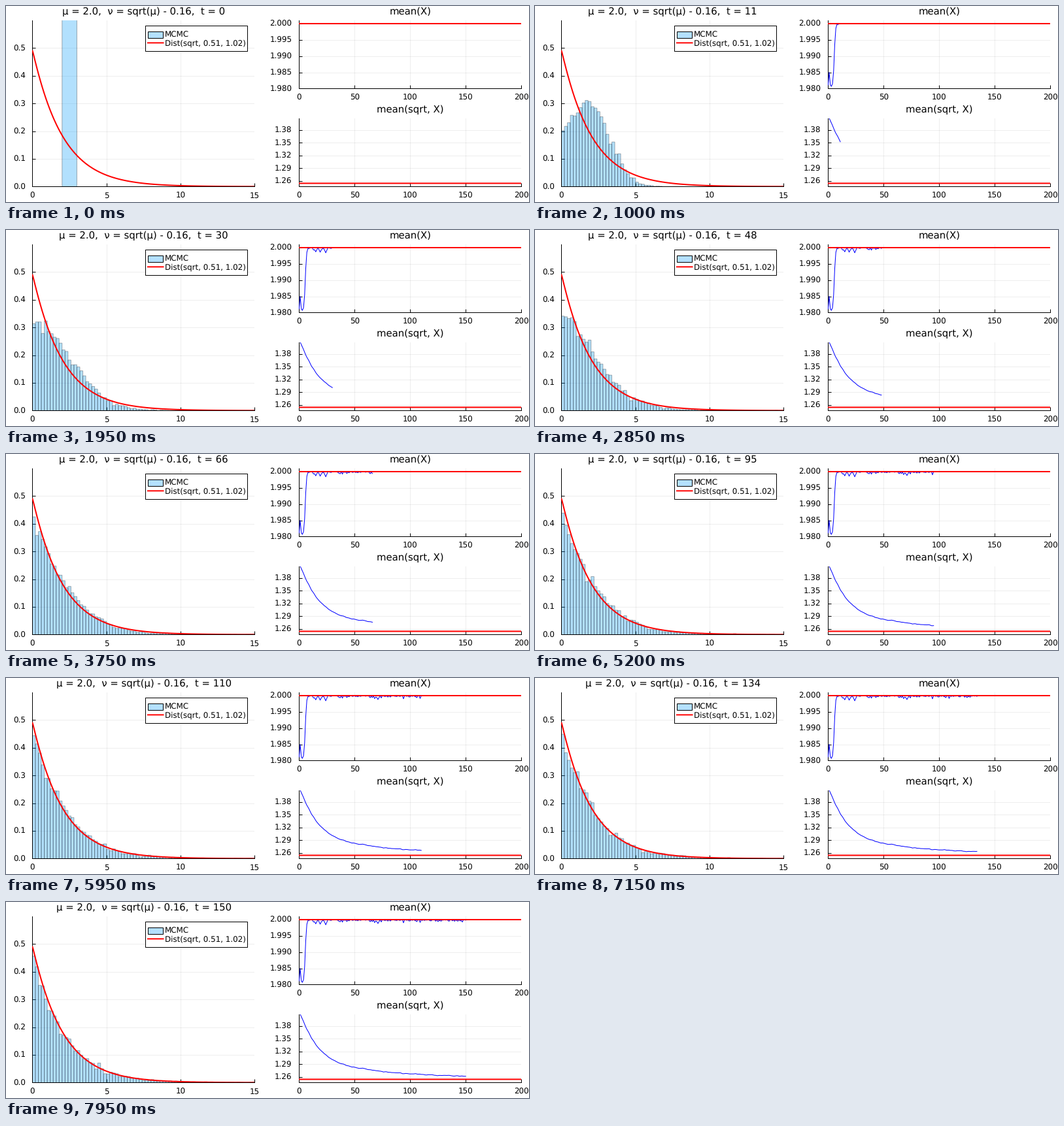
These frames come from a looping animation (800 by 300 pixels, 8 s). A matplotlib script:

```python
import math

import matplotlib.pyplot as plt
import numpy as np
from matplotlib.animation import FuncAnimation
from matplotlib.lines import Line2D
from matplotlib.patches import Rectangle

W, H, DPI = 800, 300, 100
PX = 72 / DPI
SMALL, LARGE = 11.85 * PX, 14.85 * PX
STEPS, HOLD = 150, 9
BIN, BINS, N = 0.2, 75, 10000
MU, NU = 2.0, 1.2542
FILL = (0, 154 / 255, 250 / 255, 0.3)

plt.rcParams.update({"font.family": "DejaVu Sans", "text.hinting": "none",
                     "path.simplify": False})
fig = plt.figure(figsize=(W / DPI, H / DPI), dpi=DPI, facecolor="white")


def label(x, y, text, size=SMALL, ha="center"):
    return fig.text(x / W, 1 - y / H, text, fontsize=size, ha=ha,
                    va="baseline", zorder=6)


def panel(box, xlim, ylim, xticks, yticks, digits, title):
    x0, y0, x1, y1 = box
    ax = fig.add_axes([x0 / W, 1 - y1 / H, (x1 - x0) / W, (y1 - y0) / H])
    ax.set(xlim=xlim, ylim=ylim, xticks=xticks, yticks=yticks)
    ax.patch.set_visible(False)
    ax.spines[["top", "right"]].set_visible(False)
    ax.spines[["left", "bottom"]].set_linewidth(PX)
    ax.tick_params(direction="in", length=5 * PX, width=PX,
                   labelleft=False, labelbottom=False)
    ax.grid(color="black", alpha=0.065, linewidth=PX)
    ax.set_axisbelow(True)
    for v in xticks:
        label(x0 + (x1 - x0) * v / xlim[1], y1 + 17.4, f"{v}")
    for v in yticks:
        y = y1 - (y1 - y0) * (v - ylim[0]) / (ylim[1] - ylim[0])
        label(x0 - 10.8, y + 4.3, f"{v:.{digits}f}", ha="right")
    return ax, label((x0 + x1) / 2 + 0.2, y0 - 8.8, title, LARGE)


def rect(x0, y0, x1, y1, color):
    fig.add_artist(Rectangle((x0 / W, 1 - y1 / H), (x1 - x0) / W, (y1 - y0) / H,
                             transform=fig.transFigure, facecolor=color,
                             edgecolor="black", linewidth=PX, zorder=5))


def target(x):
    return 0.49 * np.exp(-0.51 * x + 0.033 * np.sqrt(x))


def folded_centre(s):
    """Centre of the folded normal of width s whose mean is MU."""
    lo, hi = 0.0, MU
    for _ in range(40):
        c = (lo + hi) / 2
        mean = (s * math.sqrt(2 / math.pi) * math.exp(-c * c / (2 * s * s))
                + c * math.erf(c / (s * math.sqrt(2))))
        lo, hi = (c, hi) if mean < MU else (lo, c)
    return (lo + hi) / 2


def density(x, t):
    """Spreading folded normal that relaxes to the target."""
    s = min(2.5066, 0.317 * t ** 0.6)
    c = folded_centre(s)
    bell = sum(np.exp(-((x - m) / s) ** 2 / 2) for m in (c, -c))
    bell /= s * math.sqrt(2 * math.pi)
    w = 1 - math.exp(-max(0, t - 30) / 45)
    return (1 - w) * bell + w * target(x)


def histograms():
    rng = np.random.default_rng(4)
    mid = (np.arange(BINS) + 0.5) * BIN
    noise = rng.normal(size=BINS)
    table = [np.zeros(BINS)]
    for t in range(1, STEPS + 1):
        noise = 0.6 * noise + 0.8 * rng.normal(size=BINS)
        count = density(mid, t) * N * BIN
        count = np.round(np.maximum(count + noise * np.sqrt(count), 0))
        table.append(count / (N * BIN))
    return table


def mean_trace(t):
    """Jump up to MU, then small dips just below it."""
    rng = np.random.default_rng(7)
    gap = 0.0195 / (1 + np.exp(np.minimum(1.8 * (t - 5.6), 50)))
    gap -= 0.0045 * np.exp(-2 * (t - 1) ** 2)
    gap += np.where(t > 8, rng.gamma(0.8, 0.0003, t.size), 0)
    for at, depth in ((15, 1.3), (19, 1.4), (24, 1.6), (71, 1.2)):
        dip = depth / 1000 * np.maximum(0, 1 - np.abs(t - at) / 2)
        gap = np.maximum(gap, dip)
    return MU - gap


def root_trace(t):
    """Fast and slow decay towards NU with a little drift."""
    rng = np.random.default_rng(5)
    drift = np.convolve(rng.normal(0, 0.0006, t.size), [0.5, 0.7, 0.5], "same")
    fast = 0.11 * np.exp(-(t / 15.4) ** 1.11)
    return NU + fast + 0.05 * np.exp(-t / 75) + drift


def title_text(t):
    return f"μ = 2.0,  ν = sqrt(μ) - 0.16,  t = {t}"


left, title = panel((40.45, 22, 380.4, 276.4), (0, 15), (0, 0.6),
                    range(0, 16, 5), [k / 10 for k in range(6)], 1,
                    title_text(0))
top, _ = panel((448.3, 22, 788.1, 126.4), (0, 200), (1.98, 2.001),
               range(0, 201, 50), [1.98 + k / 200 for k in range(5)], 3,
               "mean(X)")
low, _ = panel((448.3, 172, 788.1, 276.4), (0, 200), (1.2465, 1.407),
               range(0, 201, 50), [1.26 + 0.03 * k for k in range(5)], 2,
               "mean(sqrt, X)")

bars = left.bar(np.arange(BINS) * BIN, np.zeros(BINS), BIN, align="edge",
                facecolor=FILL, edgecolor=(0, 0, 0, 0.3), linewidth=PX,
                snap=False)
xs = np.linspace(0, 15, 400)
left.plot(xs, target(xs), color="red", lw=2 * PX, zorder=3)
mean_line, = top.plot([], [], color="blue", lw=PX, zorder=3)
root_line, = low.plot([], [], color="blue", lw=PX, zorder=3)
for ax, level in ((top, MU), (low, NU)):
    ax.plot([0, 200], [level] * 2, color="red", lw=2 * PX, zorder=4, snap=False)

rect(213, 30, 369, 69, "white")
rect(217, 38.8, 240, 48.8, (0.7, 0.88, 1))
fig.add_artist(Line2D([217 / W, 240.5 / W], [1 - 56.4 / H] * 2, color="red",
                      lw=2 * PX, zorder=6, snap=False,
                      transform=fig.transFigure))
label(243.2, 48, "MCMC", ha="left")
label(243.2, 60.8, "Dist(sqrt, 0.51, 1.02)", ha="left")

heights = histograms()
steps = np.arange(STEPS + 1)
mean_x, mean_root = mean_trace(steps), root_trace(steps)


def update(i):
    t = max(0, i - HOLD)
    title.set_text(title_text(t))
    for bar, h in zip(bars, heights[t]):
        bar.set_height(h)
        bar.set_visible(h > 0)
    # Before the first step all values sit in one wide bin
    first = bars[0]
    first.set_x(0 if t else 2)
    first.set_width(BIN if t else 1)
    if t == 0:
        first.set_height(1)
        first.set_visible(True)
    n = t + 1 if t else 0
    mean_line.set_data(steps[:n], mean_x[:n])
    root_line.set_data(steps[:n], mean_root[:n])
    return []


anim = FuncAnimation(fig, update, frames=HOLD + STEPS + 1, interval=50,
                     repeat=True, repeat_delay=0)
plt.show()
```
